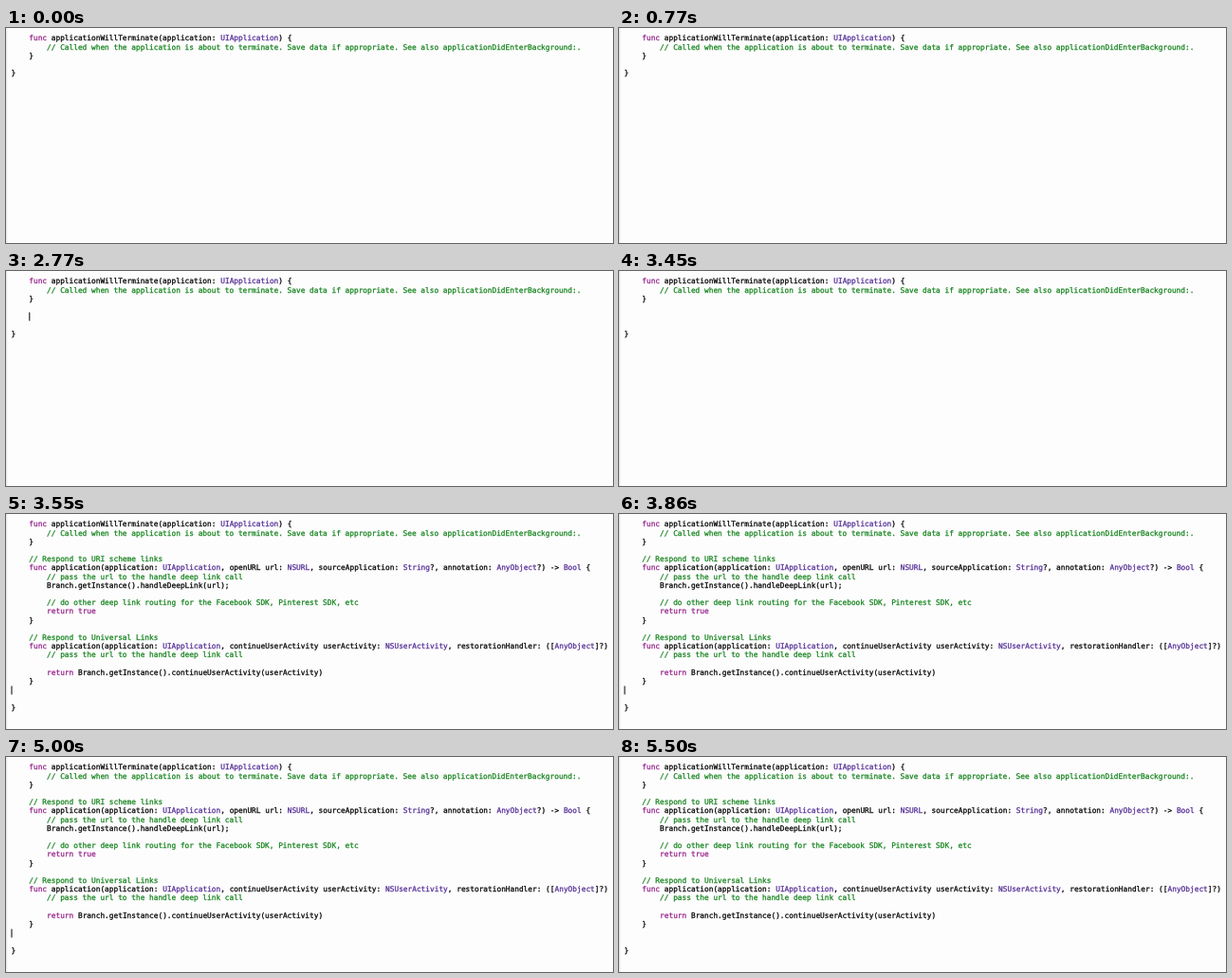
An HTML page that plays this animation: 640x227 px, repeating every 5550 ms.

```html
<!DOCTYPE html>
<html lang="en">
<head>
<meta charset="utf-8">
<title>Code editor</title>
<style>
  html, body { margin: 0; width: 100%; height: 100%; overflow: hidden; background: #fefdfe; }
  svg { display: block; width: 640px; height: 227px; }
  text {
    font: 7.8px "DejaVu Sans Mono", "Liberation Mono", monospace;
    text-rendering: geometricPrecision;
    white-space: pre;
    color: #000;
    fill: currentColor;
    stroke: currentColor;
    stroke-width: 0.25px;
  }
  .comment { color: #12821a; }
  .keyword { color: #942089; }
  .type { color: #522c94; }
</style>
</head>
<body>
<svg viewBox="0 0 640 227">
  <rect width="1.5" height="227" fill="#ebebef"/>
  <g id="code"></g>
  <rect id="caret" width="1" height="9"/>
</svg>
<script>
const LOOP = 5550, BLINK = 560;
const LEFT = 5.5, ADVANCE = 4.697, BASE = 13.4, PITCH = 9.2;

const head = `    func applicationWillTerminate(application: UIApplication) {
        // Called when the application is about to terminate. Save data if appropriate. See also applicationDidEnterBackground:.
    }`;

const pasted = `    // Respond to URI scheme links
    func application(application: UIApplication, openURL url: NSURL, sourceApplication: String?, annotation: AnyObject?) -> Bool {
        // pass the url to the handle deep link call
        Branch.getInstance().handleDeepLink(url);

        // do other deep link routing for the Facebook SDK, Pinterest SDK, etc
        return true
    }

    // Respond to Universal Links
    func application(application: UIApplication, continueUserActivity userActivity: NSUserActivity, restorationHandler: ([AnyObject]?)
        // pass the url to the handle deep link call

        return Branch.getInstance().continueUserActivity(userActivity)
    }`;

// Each edit restarts the caret blink; row and col count from 0.
const steps = [
  { at: 0, caretOn: 960, row: 2, col: 5, text: head + "\n\n}" },
  { at: 2150, row: 3, col: 4, text: head + "\n\n\n}" },
  { at: 2600, row: 4, col: 4, text: head + "\n\n\n\n}" },
  { at: 3490, row: 19, col: 0, text: head + "\n\n" + pasted + "\n\n\n}" }
];

const svgNS = "http://www.w3.org/2000/svg";
const code = document.getElementById("code");
const caret = document.getElementById("caret");
const token = /(\/\/.*)|\b(func|return|true)\b|\b(UIApplication|NSURL|NSUserActivity|String|AnyObject|Bool)\b/g;
const baseline = row => BASE + row * PITCH;
const columnX = col => LEFT + col * ADVANCE;

function addRun(str, row, col, kind) {
  const indent = str.search(/\S/);
  if (indent < 0) return;
  const run = document.createElementNS(svgNS, "text");
  run.setAttribute("x", columnX(col + indent));
  run.setAttribute("y", baseline(row));
  if (kind) run.setAttribute("class", kind);
  run.textContent = str.slice(indent);
  code.append(run);
}

function drawCode(source) {
  code.replaceChildren();
  source.split("\n").forEach((line, row) => {
    let end = 0;
    for (const m of line.matchAll(token)) {
      addRun(line.slice(end, m.index), row, end);
      addRun(m[0], row, m.index, m[1] ? "comment" : m[2] ? "keyword" : "type");
      end = m.index + m[0].length;
    }
    addRun(line.slice(end), row, end);
  });
}

let shown;
function render(t) {
  const step = steps.findLast(s => t >= s.at);
  if (step !== shown) {
    shown = step;
    drawCode(step.text);
    caret.setAttribute("x", columnX(step.col));
    caret.setAttribute("y", baseline(step.row) - 6.6);
  }
  const since = t - (step.caretOn ?? step.at);
  const visible = since >= 0 && Math.floor(since / BLINK) % 2 === 0;
  caret.setAttribute("visibility", visible ? "visible" : "hidden");
}

const start = performance.now();
function tick() {
  render((performance.now() - start) % LOOP);
  requestAnimationFrame(tick);
}
tick();
</script>
</body>
</html>
```
